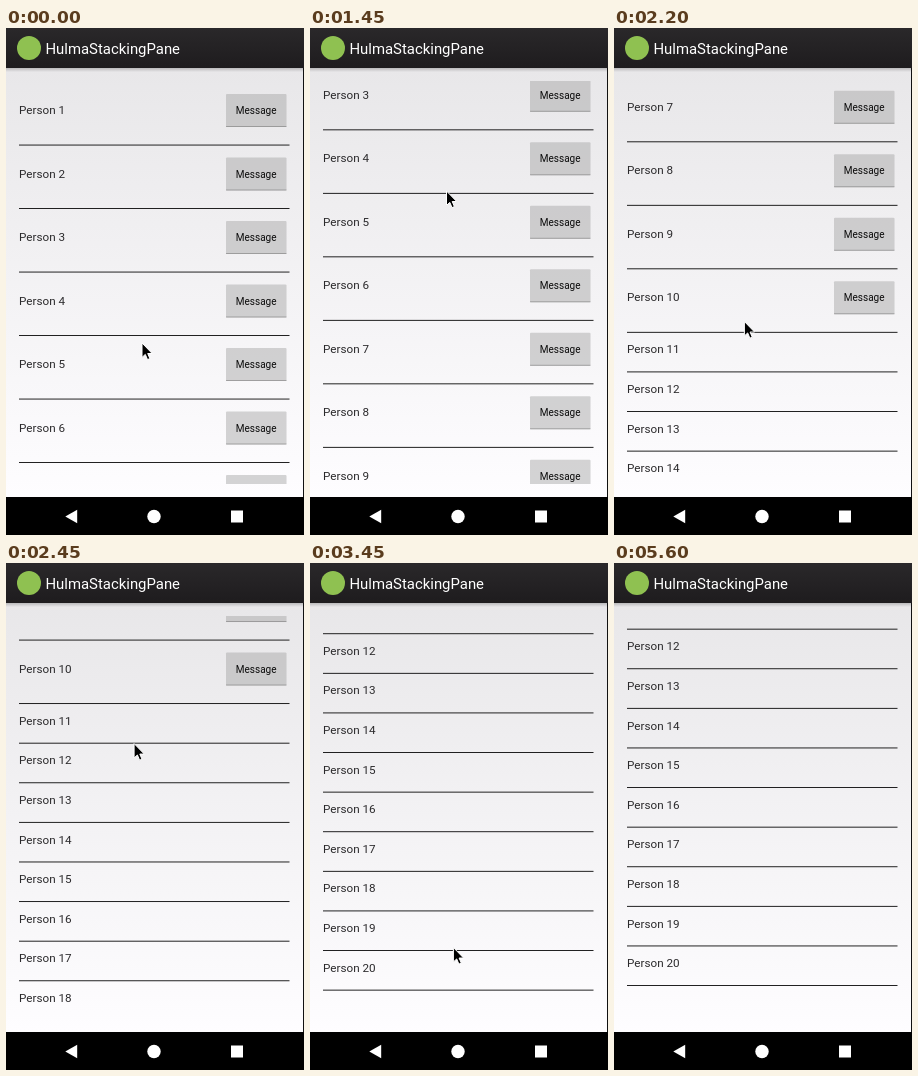
An HTML page that plays this animation: 298x507 px, repeating every 6.55 s.

```html
<!DOCTYPE html>
<html lang="en">
<head>
<meta charset="utf-8">
<title>Scrolling list</title>
<style>
  html, body { margin: 0; width: 100%; height: 100%; overflow: hidden; background: #000; }
  svg { display: block; width: 100%; height: 100%; }
  text { font-family: Roboto, "Noto Sans", sans-serif; }
  .title { font-size: 14.9px; fill: #fff; }
  .name { font-size: 11.7px; fill: #2b2a2c; }
  .label { font-size: 10px; fill: #0c0c0c; text-anchor: middle; }
  .rule { fill: #0a0a0a; }
  .face { fill: rgba(165, 165, 165, .47); }
  .edge { fill: rgba(110, 110, 110, .5); }
</style>
</head>
<body>
<svg viewBox="0 0 298 507" preserveAspectRatio="none">
  <defs>
    <linearGradient id="page" x2="0" y2="1">
      <stop offset="0" stop-color="#e8e7e9"/>
      <stop offset="1" stop-color="#fefdff"/>
    </linearGradient>
    <linearGradient id="bar" x2="0" y2="1">
      <stop offset="0" stop-color="#2a282a"/>
      <stop offset="1" stop-color="#1e1c1e"/>
    </linearGradient>
    <linearGradient id="shade" x2="0" y2="1">
      <stop offset="0" stop-color="#000" stop-opacity=".2"/>
      <stop offset="1" stop-color="#000" stop-opacity="0"/>
    </linearGradient>
    <clipPath id="view"><rect x="12" y="53" width="273" height="403"/></clipPath>
  </defs>

  <rect y="40" width="298" height="429" fill="url(#page)"/>
  <rect y="40" width="298" height="4" fill="url(#shade)"/>
  <g clip-path="url(#view)"><g id="list"></g></g>
  <rect x="297" y="40" width="1" height="429" fill="#111"/>

  <rect width="298" height="40" fill="url(#bar)"/>
  <circle cx="23" cy="20" r="12" fill="#8fc151"/>
  <text class="title" x="39.5" y="26">HulmaStackingPane</text>

  <rect y="469" width="298" height="38"/>
  <g fill="#fff">
    <path d="M59.3 488.5 71.2 481.8V495.2Z"/>
    <circle cx="148" cy="488.5" r="6.7"/>
    <rect x="225" y="482.5" width="12" height="12"/>
  </g>

  <path id="cursor" d="M0 0V14.4L3.3 11.4 5.5 16.6 7.9 15.6 5.7 10.5H10.2Z"
        fill="#000" stroke="#fff" stroke-linejoin="round"/>
</svg>
<script>
(() => {
  const LOOP = 6550, STEP = 50, HIDE_AT = 5600;
  const SVG = "http://www.w3.org/2000/svg";
  const list = document.getElementById("list");
  const cursor = document.getElementById("cursor");

  function add(tag, attrs, text = "") {
    const el = document.createElementNS(SVG, tag);
    for (const key in attrs) el.setAttribute(key, attrs[key]);
    el.textContent = text;
    list.append(el);
  }

  // Ten tall rows with a button, then ten short ones
  let rowTop = 53.5;
  for (let i = 1; i <= 20; i++) {
    const tall = i <= 10;
    const mid = rowTop + (tall ? 28.5 : 17);
    rowTop += tall ? 63.5 : 39.6;
    add("text", { class: "name", x: 13, y: mid + 4.2 }, "Person " + i);
    add("rect", { class: "rule", x: 13, y: rowTop - .4, width: 270.5, height: .9 });
    if (tall) {
      add("rect", { class: "face", x: 220, y: mid - 16, width: 60.5, height: 33, rx: 1 });
      add("rect", { class: "edge", x: 220, y: mid + 16, width: 60.5, height: 1 });
      add("text", { class: "label", x: 250.2, y: mid + 4.1 }, "Message");
    }
  }

  const clamp = u => Math.min(1, Math.max(0, u));
  const smooth = u => u * u * (3 - 2 * u);

  // A swipe: quick pick-up, then a decelerating fling
  const swipe = (t, start, length, distance) =>
    distance * (1 - (1 - clamp((t - start) / length) ** 1.5) ** 3);

  const scrollAt = t =>
    swipe(t, 1150, 853, 282) + swipe(t, 2000, 915, 370) + swipe(t, 3300, 400, 10);

  // Turning points of the pointer: time, x, y
  const turns = [
    [0, 136, 315], [450, 131, 176], [1050, 138, 312], [1250, 136, 312],
    [1650, 137, 14], [1880, 133, 423], [2500, 128, 176], [3050, 144, 395],
    [3350, 144, 395], [4150, 130, 151], [4700, 130, 151],
    [5050, 123, 321], [5300, 123, 321], [5550, 143, 14]
  ];

  function pointerAt(t) {
    const n = turns.findIndex(p => p[0] > t);
    if (n < 0) return turns[turns.length - 1].slice(1);
    const [t0, x0, y0] = turns[n - 1], [t1, x1, y1] = turns[n];
    const u = smooth((t - t0) / (t1 - t0));
    return [x0 + (x1 - x0) * u, y0 + (y1 - y0) * u];
  }

  const move = (el, x, y) => el.setAttribute("transform", `translate(${x} ${y})`);

  // Motion advances in discrete 50 ms steps
  const begin = performance.now();
  function draw() {
    const elapsed = (performance.now() - begin) % LOOP;
    const t = Math.floor(elapsed / STEP) * STEP;
    move(list, 0, -scrollAt(t));
    move(cursor, ...pointerAt(t));
    cursor.setAttribute("visibility", t < HIDE_AT ? "visible" : "hidden");
    requestAnimationFrame(draw);
  }
  draw();
})();
</script>
</body>
</html>
```
